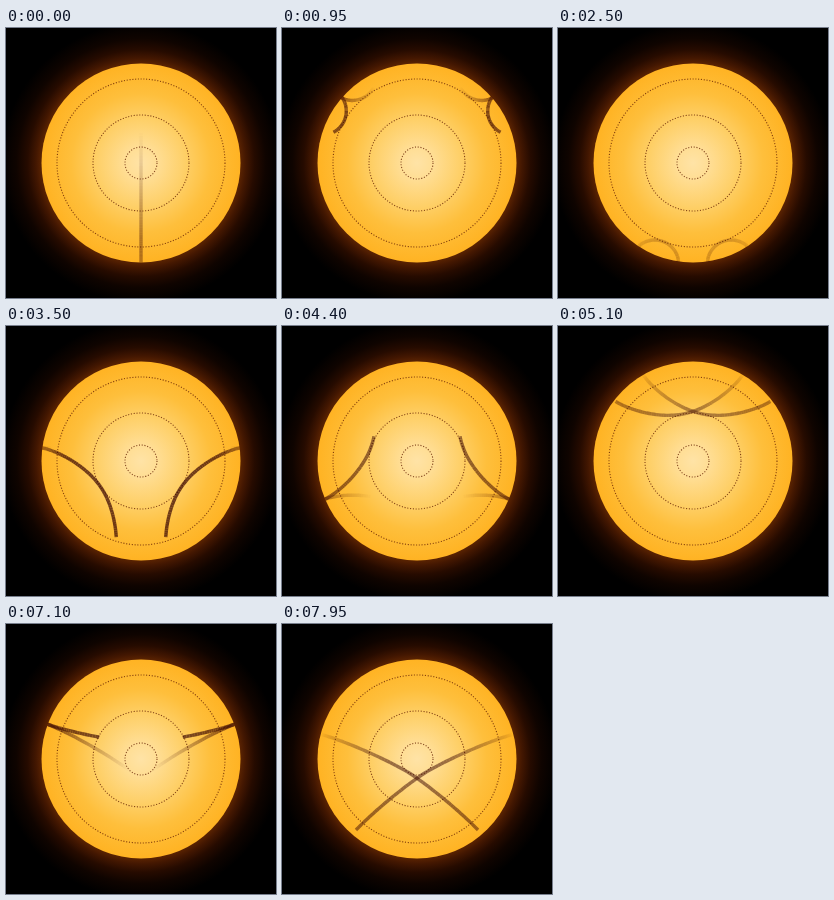
Write an HTML page with a canvas that moves like this. It is 270 by 270 pixels and loops after 8000 ms.

```html
<!DOCTYPE html>
<html lang="en">
<head>
<meta charset="utf-8">
<title>Sound rays in a star</title>
<style>
  html, body { margin: 0; width: 100%; height: 100%; overflow: hidden; background: #000; }
  canvas { display: block; width: 100vmin; height: 100vmin; }
</style>
</head>
<body>
<canvas id="stage"></canvas>
<script>
const SIZE = 270, MID = 135, R = 99.5, LOOP = 8000;
const TRAIL = 470, STEP = 6;

// depth: turning radius, span: degrees between bounces, hop: ms per bounce
const rays = [
  { depth: 0, span: 180, hop: 558, start: -2920, hops: 5 },
  { depth: 84, span: 24.5, hop: 350, start: 10, hops: 7 },
  { depth: 48, span: 82.5, hop: 505, start: 2610, hops: 6 },
  { depth: 16, span: 145.2, hop: 553, start: 5800, hops: 5 }
];

const canvas = document.getElementById('stage');
const ctx = canvas.getContext('2d');
const ratio = window.devicePixelRatio || 1;
canvas.width = canvas.height = Math.round(Math.min(innerWidth, innerHeight) * ratio) || SIZE;
ctx.scale(canvas.width / SIZE, canvas.width / SIZE);

function radial(radius, stops) {
  const g = ctx.createRadialGradient(MID, MID, 0, MID, MID, radius);
  stops.forEach(([at, color]) => g.addColorStop(at, color));
  return g;
}

const glow = radial(140, [
  [0.7, '#602602'], [0.75, '#431701'], [0.81, '#260b00'], [0.89, '#0f0400'], [1, '#000']
]);
const surface = radial(R, [
  [0, '#ffe3a6'], [0.18, '#ffdd92'], [0.45, '#fecf66'], [0.7, '#febf3c'], [1, '#ffb323']
]);

function circle(radius) {
  ctx.beginPath();
  ctx.arc(MID, MID, radius, 0, Math.PI * 2);
}

function drawStar() {
  ctx.fillStyle = '#000';
  ctx.fillRect(0, 0, SIZE, SIZE);
  ctx.fillStyle = glow;
  ctx.fillRect(0, 0, SIZE, SIZE);
  ctx.fillStyle = surface;
  circle(R);
  ctx.fill();
  ctx.strokeStyle = 'rgba(100, 32, 0, 0.8)';
  ctx.lineWidth = 1.1;
  ctx.setLineDash([1.1, 1.7]);
  for (const ray of rays) {
    if (!ray.depth) continue;
    circle(ray.depth);
    ctx.stroke();
  }
  ctx.setLineDash([]);
}

// Each hop is a hypocycloid arch between two surface cusps.
function locate(ray, age) {
  const n = Math.floor(age / ray.hop);
  const turn = (age / ray.hop - n) * Math.PI * 2;
  const b = (R - ray.depth) / 2;
  const x = R - b + b * Math.cos(turn), y = -b * Math.sin(turn);
  const natural = Math.PI * (1 - ray.depth / R);
  const span = ray.span * Math.PI / 180;
  const angle = n * span + (b * turn / R + Math.atan2(y, x)) * span / natural;
  const r = Math.hypot(x, y);
  return [r * Math.sin(angle), MID - r * Math.cos(angle)];
}

function drawRay(ray, time) {
  const age = time - ray.start;
  const end = ray.hop * ray.hops - 0.01;
  const first = Math.max(0, age - TRAIL), last = Math.min(age, end);
  if (last <= first) return;
  const sides = ray.depth ? [-1, 1] : [1];
  const strength = 0.95 * (1 - Math.min(age, end) / ray.hop / 9);
  ctx.lineWidth = 3.4;
  for (const side of sides) {
    for (let at = first; at < last; at += STEP) {
      const [x1, y1] = locate(ray, at);
      const [x2, y2] = locate(ray, Math.min(at + STEP, last));
      const fade = Math.min(1, 2.2 * (1 - (age - at) / TRAIL));
      ctx.strokeStyle = `rgba(66, 14, 6, ${strength * fade})`;
      ctx.beginPath();
      ctx.moveTo(MID + side * x1, y1);
      ctx.lineTo(MID + side * x2, y2);
      ctx.stroke();
    }
  }
}

const origin = performance.now();
function frame() {
  const time = (performance.now() - origin) % LOOP;
  drawStar();
  rays.forEach(ray => drawRay(ray, Math.floor(time / 50) * 50));
  requestAnimationFrame(frame);
}
frame();
</script>
</body>
</html>
```
